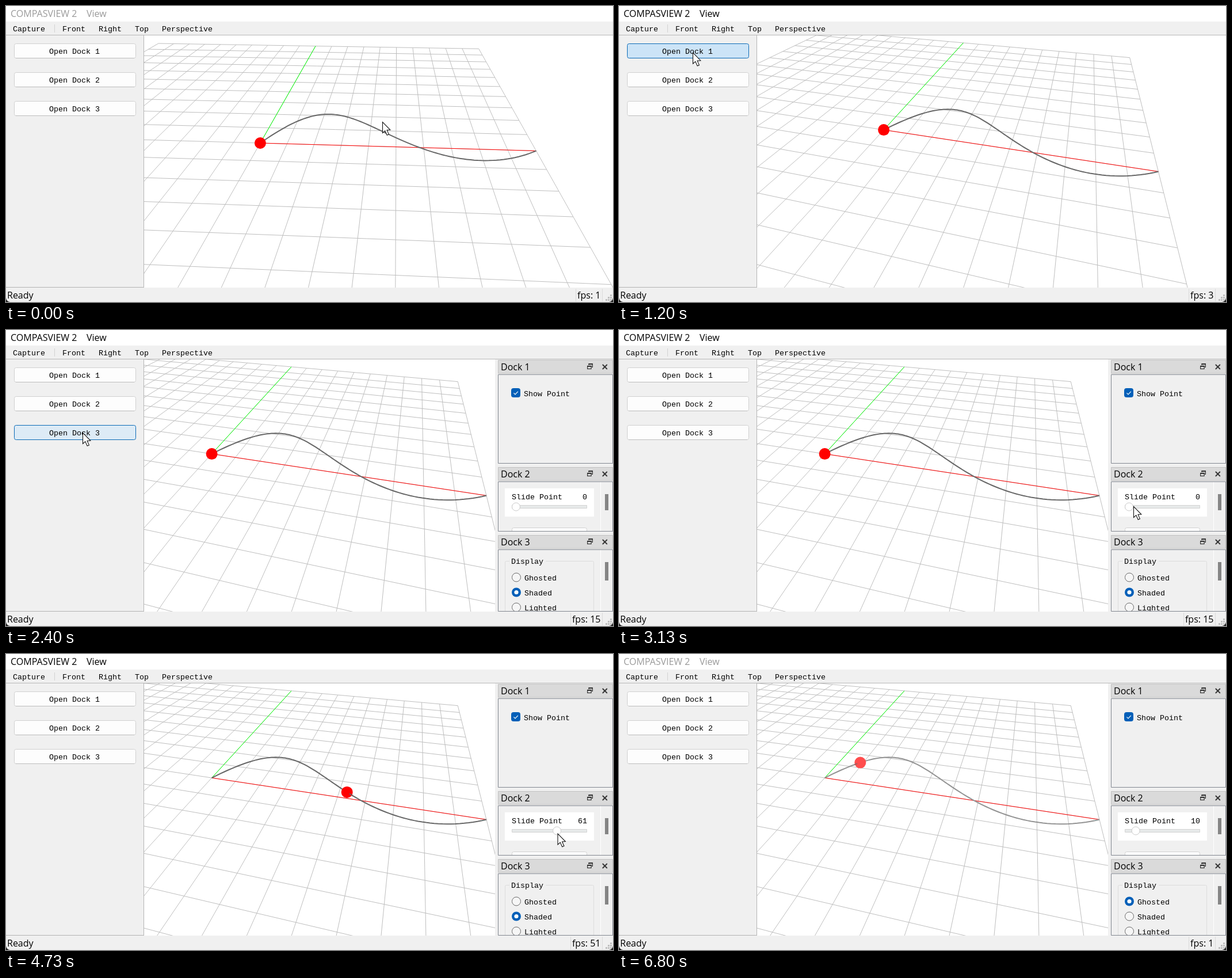
Write an HTML page with a canvas that moves like this. It is 1055 px wide and 514 px high and loops after 6940 ms.

```html
<!DOCTYPE html>
<html lang="en">
<head>
<meta charset="utf-8">
<title>Viewer</title>
<style>
  html, body { margin: 0; width: 100%; height: 100%; overflow: hidden; background: #fff; }
  canvas { display: block; width: 1055px; height: 514px; }
</style>
</head>
<body>
<canvas id="stage" width="1055" height="514"></canvas>
<script>
const ctx = document.getElementById('stage').getContext('2d');
const LOOP = 6940;
const UI = '16px "Open Sans", "Noto Sans", sans-serif';
const MONO = '13.33px "Liberation Mono", "Noto Sans Mono", monospace';
const GREY = '#f0f0f0', BLUE = '#005fb8';

// pointer track: time, x, y
const TRACK = [
  [0, 654, 201], [60, 654, 201], [70, 667, 205], [270, 667, 205],
  [530, 649, 209], [600, 649, 209], [670, 600, 195], [1000, 135, 100],
  [1070, 128, 82], [1270, 128, 80], [1330, 128, 84], [1600, 131, 124],
  [1730, 130, 129], [2070, 130, 133], [2270, 132, 176], [2400, 133, 178],
  [2600, 560, 260], [2800, 932, 309], [2930, 912, 291], [3130, 894, 306],
  [3200, 888, 307], [3330, 888, 307], [3600, 907, 309], [3800, 935, 311],
  [4000, 972, 311], [4070, 990.5, 311], [4130, 1025, 311], [4330, 1025, 311],
  [4600, 985, 312], [4870, 930, 311], [5070, 900, 310], [5130, 897, 320],
  [5330, 896, 434], [5400, 896, 434], [5470, 894, 435], [5530, 893, 433],
  [6000, 893, 433], [6130, 790, 445], [6270, 552, 470]
];
const FPS = [[0, 1], [400, 3], [1930, 15], [3800, 2], [4730, 51], [6800, 1]];
const OPEN = [1270, 1930, 2330];

const clamp = (v, a, b) => Math.min(b, Math.max(a, v));
const mix = (a, b, p) => a + (b - a) * p;

function tick(t) {
  const stamp = k => Math.round(k * 20 / 3) * 10;
  const k = Math.floor(t * 0.015 + 0.06);
  return stamp(stamp(k) > t ? k - 1 : k);
}

function pointerAt(t) {
  const i = TRACK.findIndex(k => k[0] > t);
  if (i < 0) return TRACK[TRACK.length - 1].slice(1);
  const [t0, x0, y0] = TRACK[i - 1], [t1, x1, y1] = TRACK[i];
  const p = (t - t0) / (t1 - t0);
  return [mix(x0, x1, p), mix(y0, y1, p)];
}

function box(x, y, w, h, fill) {
  ctx.fillStyle = fill;
  ctx.fillRect(x, y, w, h);
}

function panel(x, y, w, h, r, fill, stroke) {
  ctx.beginPath();
  ctx.roundRect(x + 0.5, y + 0.5, w - 1, h - 1, r);
  if (fill) { ctx.fillStyle = fill; ctx.fill(); }
  if (stroke) { ctx.strokeStyle = stroke; ctx.lineWidth = 1; ctx.stroke(); }
}

function disc(x, y, r, fill, stroke) {
  ctx.beginPath();
  ctx.arc(x, y, r, 0, 7);
  ctx.fillStyle = fill;
  ctx.fill();
  if (stroke) { ctx.strokeStyle = stroke; ctx.lineWidth = 1; ctx.stroke(); }
}

function label(str, x, y, font = MONO, fill = '#000', align = 'left') {
  ctx.font = font;
  ctx.fillStyle = fill;
  ctx.textAlign = align;
  ctx.fillText(str, x, y);
}

function trace(pts, color, width) {
  ctx.beginPath();
  pts.forEach(p => ctx.lineTo(p[0], p[1]));
  ctx.strokeStyle = color;
  ctx.lineWidth = width;
  ctx.stroke();
}

function clipTo(x, y, w, h, draw) {
  ctx.save();
  ctx.beginPath();
  ctx.rect(x, y, w, h);
  ctx.clip();
  draw();
  ctx.restore();
}

// orbit camera looking at a point on the ground plane
function camera(p, cx) {
  const yaw = mix(2.65, 14, p) * Math.PI / 180, pitch = 40.3 * Math.PI / 180;
  const tx = mix(4.405, 4.542, p), ty = mix(-0.847, -0.832, p);
  const c = Math.cos(yaw), s = Math.sin(yaw);
  const focal = 219 / Math.tan(Math.PI / 8);
  return ([x, y]) => {
    const side = (x - tx) * c + (y - ty) * s;
    const ahead = (y - ty) * c - (x - tx) * s;
    const depth = 10.415 + ahead * Math.cos(pitch);
    return [cx + focal * side / depth, 270 - focal * ahead * Math.sin(pitch) / depth, depth];
  };
}

// cubic Bezier through (0,0) (3,6) (5,-3) (10,0)
function bezier(t) {
  const u = 1 - t;
  return [9 * u * u * t + 15 * u * t * t + 10 * t ** 3, 18 * u * u * t - 9 * u * t * t];
}

function scene(t, right, value) {
  const cam = camera(clamp((t - 270) / 260, 0, 1), (240 + right) / 2);
  const line = (a, b, color) => trace([cam(a), cam(b)], color, 1);
  clipTo(240, 51, right - 240, 438, () => {
    box(240, 51, right - 240, 438, '#fff');
    for (let i = -10; i <= 10; i++) {
      line([i, -10], [i, 10], '#bebebe');
      line([-10, i], [10, i], '#bebebe');
    }
    line([0, 0], [10, 0], '#f00');
    line([0, 0], [0, 10], '#0f0');
    const curve = Array.from({ length: 101 }, (_, i) => cam(bezier(i / 100)));
    const dot = cam(bezier(value / 100));
    const ghost = t >= 5730;
    const ink = ghost ? '#929292' : '#666';
    trace(curve, ink, 2);
    disc(dot[0], dot[1], 10, ghost ? '#ff4d4d' : '#f00');
    // the part of the curve nearer than the dot shows above it
    clipTo(dot[0] - 10, dot[1] - 10, 20, 20, () => {
      const near = curve.filter((p, i) => p[2] < dot[2] && Math.abs(i - value) < 8);
      if (value > 0 && near.length) trace(near, ghost ? '#a06060' : '#7d5555', 2);
    });
  });
}

function button(text, y, hover, down) {
  const fill = down ? '#cce4f7' : hover ? '#ddebf6' : '#fdfdfd';
  panel(14, y, 212, 26, 3, fill, hover ? '#0a6ab6' : '#d0d0d0');
  if (!hover) box(17, y + 25, 206, 1, '#bcbcbc');
  label(text, 75, y + 18);
}

function dock(n, top, bottom, draw) {
  panel(855, top, 200, 24, 0, '#dadada', '#c2c2c2');
  label('Dock ' + n, 860, top + 18, UI);
  ctx.strokeStyle = '#333';
  ctx.lineWidth = 1.2;
  ctx.strokeRect(1010.6, top + 10.5, 6.5, 5);
  ctx.beginPath();
  ctx.moveTo(1013, top + 9); ctx.lineTo(1013, top + 6.8);
  ctx.lineTo(1019.4, top + 6.8); ctx.lineTo(1019.4, top + 12.5); ctx.lineTo(1018, top + 12.5);
  ctx.stroke();
  box(1012.5, top + 6.2, 7.4, 2, '#333');
  box(1010, top + 10, 7.6, 2, '#333');
  trace([[1036.8, top + 8], [1044.8, top + 16]], '#333', 1.8);
  trace([[1044.8, top + 8], [1036.8, top + 16]], '#333', 1.8);
  const y = top + 25;
  panel(855, y, 200, bottom - y, 0, GREY, '#828790');
  clipTo(856, y + 1, 198, bottom - y - 2, () => draw(y));
}

function scrollbar(y, h) {
  box(1033, y + 1, 1, 110, '#fff');
  box(1041, y + 22, 6, h, '#858585');
}

function dockPoint(y) {
  panel(878, y + 24, 16, 16, 3, BLUE, BLUE);
  trace([[882.5, y + 32.3], [885, y + 34.8], [889.8, y + 29.8]], '#fff', 1.2);
  label('Show Point', 900, y + 38);
}

function dockSlider(y, value, extra) {
  const end = 1010 + extra;
  box(867, y + 12, 155 + extra, 49, '#fff');
  label('Slide Point', 879, y + 31);
  label(value, end, y + 31, MONO, '#000', 'right');
  panel(879, y + 41, 131 + extra, 6, 0, '#e7eaea', '#d3d3d3');
  disc(886.5 + value * 1.165, y + 44, 7, '#fff', '#cbcbcb');
  panel(879, y + 80, 131 + extra, 26, 3, '#fdfdfd', '#d0d0d0');
  if (!extra) scrollbar(y, 28);
}

function dockDisplay(y, t) {
  panel(867, y + 20, 155, 190, 2, null, '#dcdcdc');
  box(875, y + 18, 63, 5, GREY);
  label('Display', 878, y + 25);
  const picked = t >= 5670 ? 0 : 1;
  ['Ghosted', 'Shaded', 'Lighted'].forEach((name, i) => {
    const cy = y + 48.5 + 26 * i;
    if (i === picked) {
      const grow = i ? 1 : clamp((t - 5600) / 330, 0, 1);
      disc(887, cy, 8, BLUE);
      disc(887, cy, mix(2.4, 3.6, grow), '#fff');
    } else {
      const hover = i === 0 && t >= 5330;
      disc(887, cy, 7.5, hover ? '#e8e8e8' : '#f6f6f6', '#6a6a6a');
    }
    label(name, 901, cy + 5);
  });
  scrollbar(y, 32);
}

function chrome(t, px, py) {
  const active = t >= 330 && t < 6800;
  box(0, 0, 1055, 27, '#fff');
  label('COMPASVIEW 2', 8, 19, UI, active ? '#000' : '#9a9a9a');
  label('View', 140, 19, UI, active ? '#000' : '#9a9a9a');
  box(0, 27, 1055, 487, GREY);
  box(0, 50, 1055, 1, '#b8b8b8');
  box(84, 32, 1, 14, '#d2d2d2');
  [['Capture', 12], ['Front', 98], ['Right', 161], ['Top', 224], ['Perspective', 271]]
    .forEach(([name, x]) => label(name, x, 44));
  OPEN.forEach((at, i) => {
    const y = 65 + 50 * i;
    const over = t > 600 && px > 14 && px < 226 && py >= y && py < y + 26;
    button('Open Dock ' + (i + 1), y, over, over && t >= at - 70 && t < at);
  });
  box(239, 51, 1, 438, '#b4b4b4');
  box(0, 488, 240, 1, '#b4b4b4');
}

function status(t) {
  const fps = FPS.filter(f => f[0] <= t).pop()[1];
  box(0, 489, 1055, 25, GREY);
  label('Ready', 2, 508, UI);
  label('fps: ' + fps, 1033.5, 508, UI, '#000', 'right');
  box(fps > 9 ? 981 : 990, 491, 1, 22, '#dadada');
  box(1036, 491, 1, 22, '#dadada');
  for (let r = 0; r < 3; r++)
    for (let c = 2 - r; c < 3; c++) box(1042 + 4 * c, 501 + 4 * r, 3, 3, '#bfbfbf');
  // rounded window corners
  ctx.fillStyle = '#222';
  for (const [x, d] of [[0, 1], [1055, -1]]) {
    ctx.beginPath();
    ctx.moveTo(x, 507);
    ctx.quadraticCurveTo(x + d, 513, x + 7 * d, 514);
    ctx.lineTo(x, 514);
    ctx.fill();
  }
}

function pointer(x, y, move) {
  ctx.save();
  ctx.translate(x, y);
  ctx.beginPath();
  if (move) {
    const arm = [[-2.5, -2.5], [-2.5, -8], [-5, -8], [0, -13.5], [5, -8], [2.5, -8]];
    for (let i = 0; i < 4; i++) {
      const c = Math.cos(i * Math.PI / 2), s = Math.sin(i * Math.PI / 2);
      arm.forEach(([a, b]) => ctx.lineTo(a * c - b * s, a * s + b * c));
    }
  } else {
    [[0.5, 0.5], [0.5, 19.5], [4.8, 15.6], [8.2, 23.3], [11.4, 21.9], [8.1, 14.4], [13.8, 14]]
      .forEach(p => ctx.lineTo(...p));
  }
  ctx.closePath();
  ctx.fillStyle = '#fff';
  ctx.fill();
  ctx.strokeStyle = '#111';
  ctx.lineWidth = 1.1;
  ctx.stroke();
  if (move) ctx.strokeRect(-1.5, -1.5, 3, 3);
  ctx.restore();
}

function draw(t) {
  const [px, py] = pointerAt(t);
  const docks = OPEN.filter(at => t >= at).length;
  const value = t < 3330 ? 0 : t < 5100 ? clamp(Math.round((px - 888) / 1.165), 0, 100) : 10;
  chrome(t, px, py);
  scene(t, docks ? 850 : 1055, value);
  if (docks) dock(1, 52, [489, 267, 232][docks - 1], dockPoint);
  if (docks === 2) dock(2, 273, 489, y => dockSlider(y, value, 20));
  if (docks === 3) {
    dock(2, 238, 350, y => dockSlider(y, value, 0));
    dock(3, 356, 489, y => dockDisplay(y, t));
  }
  status(t);
  if (t < 6330) pointer(px, py, t >= 330 && t < 670);
}

const start = performance.now();
function loop() {
  draw(tick((performance.now() - start) % LOOP));
  requestAnimationFrame(loop);
}
loop();
</script>
</body>
</html>
```
